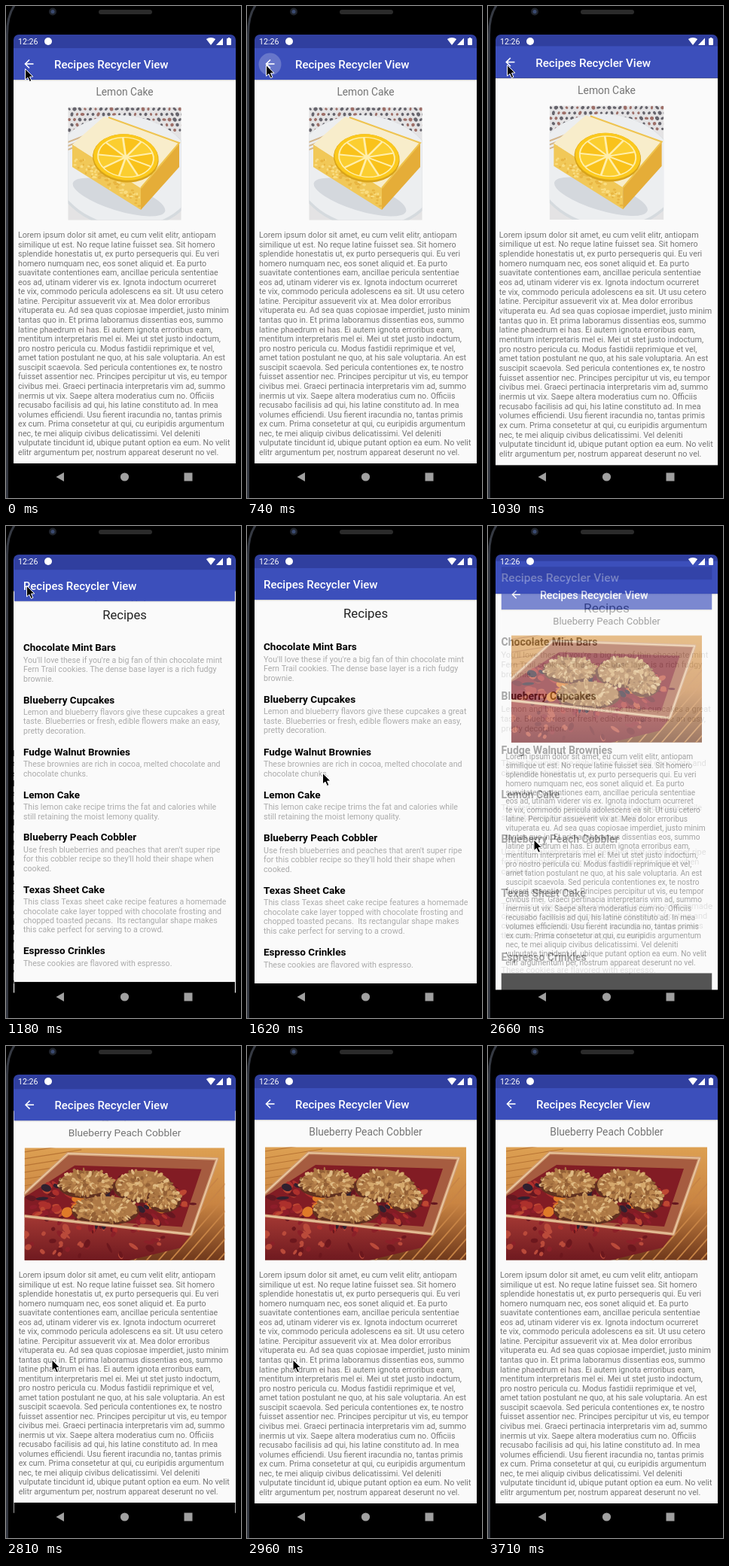
Recreate the animation shown at these times as an HTML page with a canvas. Size 312x654 px, loop 4.01 s.

```html
<!DOCTYPE html>
<html lang="en">
<head>
<meta charset="utf-8">
<title>Recipes Recycler View</title>
<style>
  html, body { margin: 0; width: 100%; height: 100%; overflow: hidden; background: #000; }
  canvas { display: block; width: 312px; height: 654px; }
</style>
</head>
<body>
<canvas id="stage"></canvas>
<script>
const W = 312, H = 654, LOOP = 4010;
const TICK = 148, LEAD = 12;
const LEFT = 10, TOP = 38, WIDTH = 295, NAV = 608;
const MID_X = 157.5, MID_Y = 346;
const LINE = 12.56;
const GREY = '#757575';
const SMALL = '10.7px Roboto, sans-serif';
const BOLD = 'bold 13.55px Roboto, sans-serif';

const dpr = window.devicePixelRatio || 1;
const makeContext = canvas => {
  canvas.width = W * dpr;
  canvas.height = H * dpr;
  return canvas.getContext('2d');
};
const stage = makeContext(document.getElementById('stage'));
const buffer = makeContext(document.createElement('canvas'));

const recipes = `Chocolate Mint Bars
You'll love these if you're a big fan of thin chocolate mint
Fern Trail cookies. The dense base layer is a rich fudgy
brownie.

Blueberry Cupcakes
Lemon and blueberry flavors give these cupcakes a great
taste. Blueberries or fresh, edible flowers make an easy,
pretty decoration.

Fudge Walnut Brownies
These brownies are rich in cocoa, melted chocolate and
chocolate chunks.

Lemon Cake
This lemon cake recipe trims the fat and calories while
still retaining the moist lemony quality.

Blueberry Peach Cobbler
Use fresh blueberries and peaches that aren't super ripe
for this cobbler recipe so they'll hold their shape when
cooked.

Texas Sheet Cake
This class Texas sheet cake recipe features a homemade
chocolate cake layer topped with chocolate frosting and
chopped toasted pecans.\u00a0 Its rectangular shape makes
this cake perfect for serving to a crowd.

Espresso Crinkles
These cookies are flavored with espresso.`.split('\n\n').map(block => block.split('\n'));

const lorem = `Lorem ipsum dolor sit amet, eu cum velit elitr, antiopam
similique ut est. No reque latine fuisset sea. Sit homero
splendide honestatis ut, ex purto persequeris qui. Eu veri
homero numquam nec, eos sonet aliquid et. Ea purto
suavitate contentiones eam, ancillae pericula sententiae
eos ad, utinam viderer vis ex. Ignota indoctum ocurreret
te vix, commodo pericula adolescens ea sit. Ut usu cetero
latine. Percipitur assueverit vix at. Mea dolor erroribus
vituperata eu. Ad sea quas copiosae imperdiet, justo minim
tantas quo in. Et prima laboramus dissentias eos, summo
latine phaedrum ei has. Ei autem ignota erroribus eam,
mentitum interpretaris mel ei. Mei ut stet justo indoctum,
pro nostro pericula cu. Modus fastidii reprimique et vel,
amet tation postulant ne quo, at his sale voluptaria. An est
suscipit scaevola. Sed pericula contentiones ex, te nostro
fuisset assentior nec. Principes percipitur ut vis, eu tempor
civibus mei. Graeci pertinacia interpretaris vim ad, summo
inermis ut vix. Saepe altera moderatius cum no. Officiis
recusabo facilisis ad qui, his latine constituto ad. In mea
volumes efficiendi. Usu fierent iracundia no, tantas primis
ex cum. Prima consetetur at qui, cu euripidis argumentum
nec, te mei aliquip civibus delicatissimi. Vel deleniti
vulputate tincidunt id, ubique putant option ea eum. No velit
elitr argumentum per, nostrum appareat deserunt no vel.`.split('\n');

const clamp = v => Math.min(1, Math.max(0, v));
const mix = (a, b, u) => a + (b - a) * u;

function seeded(seed) {
  return () => (seed = (seed * 16807) % 2147483647) / 2147483647;
}

function rect(c, x, y, w, h, color) {
  c.fillStyle = color;
  c.fillRect(x, y, w, h);
}

function trace(c, points) {
  c.beginPath();
  points.forEach(([x, y]) => c.lineTo(x, y));
}

function poly(c, points, color) {
  trace(c, points);
  c.closePath();
  c.fillStyle = color;
  c.fill();
}

function line(c, points, width, color) {
  trace(c, points);
  c.lineWidth = width;
  c.strokeStyle = color;
  c.stroke();
}

function oval(c, x, y, rx, ry, color, turn = 0) {
  c.beginPath();
  c.ellipse(x, y, rx, ry, turn, 0, Math.PI * 2);
  c.fillStyle = color;
  c.fill();
}

function pill(c, x, y, w, h, r, color) {
  c.beginPath();
  c.roundRect(x, y, w, h, r);
  c.fillStyle = color;
  c.fill();
}

function fade(c, y, h, ...colors) {
  const g = c.createLinearGradient(0, y, 0, y + h);
  colors.forEach((color, i) => g.addColorStop(i / (colors.length - 1), color));
  return g;
}

function text(c, str, x, y, font, color, align = 'left') {
  c.font = font;
  c.textAlign = align;
  c.fillStyle = color;
  c.fillText(str, x, y);
}

// Fills an ellipse with random flecks of the given colours.
function flecks(c, count, x, y, rx, ry, size, colors, rnd) {
  for (let i = 0; i < count; i++) {
    const a = rnd() * Math.PI * 2, d = Math.sqrt(rnd());
    oval(c, x + Math.cos(a) * rx * d, y + Math.sin(a) * ry * d,
      size * (0.5 + rnd()), size * (0.3 + rnd() * 0.6), colors[Math.floor(rnd() * colors.length)], a);
  }
}

function lemonPhoto(c) {
  const rnd = seeded(41);
  rect(c, 82, 134, 151, 151, '#e4e3e4');
  for (let i = 0; i < 110; i++) {
    const row = Math.floor(i / 22);
    oval(c, 84 + (i % 22) * 7 + (row % 2) * 3.5, 137 + row * 7, 1.5 + rnd() * 1.4, 1.5 + rnd(),
      rnd() < 0.3 ? '#9d6f68' : '#66646c', rnd() * 3);
  }
  oval(c, 158, 221, 96, 75, '#d5dade', 0.15);
  oval(c, 158, 219, 94, 73, '#eceef0', 0.15);
  for (let i = 0; i < 3; i++) line(c, [[82, 181 + i * 5], [118, 167 + i * 5]], 2, '#d3b58c');
  oval(c, 150, 254, 64, 18, '#d4d8dd', 0.3);

  const left = [88, 184], front = [179, 242], right = [230, 182], drop = ([x, y], h) => [x, y + h];
  poly(c, [left, front, drop(front, 29), drop(left, 30)], '#f1c858');
  poly(c, [front, right, drop(right, 32), drop(front, 29)], '#e5ad38');
  for (let i = 0; i < 70; i++) {
    const u = rnd();
    oval(c, mix(90, 178, u), mix(195, 250, u) + rnd() * 18, 1 + rnd() * 2, 1 + rnd(), i % 2 ? '#f9dd82' : '#e8b541');
  }
  poly(c, [[130, 147], right, front, left], '#f8edcb');
  line(c, [[136, 148], right, front], 2, '#efc450');

  c.save();
  c.translate(159, 201);
  c.rotate(0.1);
  c.scale(1, 0.71);
  oval(c, 0, 2, 44, 45, '#d8a31a');
  oval(c, 0, 0, 43, 43, '#fbc91d');
  oval(c, 0, 0, 38, 38, '#ffeeaa');
  for (let i = 0; i < 9; i++) {
    c.rotate(Math.PI * 2 / 9);
    c.beginPath();
    c.moveTo(4, 0);
    c.arc(0, 0, 36, -0.31, 0.31);
    c.fillStyle = i % 2 ? '#fbce30' : '#f9c21b';
    c.fill();
  }
  c.restore();
}

function cobblerPhoto(c) {
  const rnd = seeded(77);
  rect(c, 24, 134, 267, 151, fade(c, 134, 150, '#dda052', '#c98442', '#70391c'));
  for (let i = 0; i < 12; i++) {
    line(c, [[24, 140 + i * 9], [100, 128 + i * 9]], 1.2, '#b87535');
    line(c, [[150 + i * 16, 290], [250 + i * 16, 175]], 1.8, '#c78446');
  }

  const backLeft = [82, 142], backRight = [281, 149], frontRight = [246, 250], frontLeft = [10, 224];
  c.lineJoin = 'round';
  poly(c, [frontLeft, frontRight, [232, 268], [150, 288], [10, 288]], fade(c, 222, 62, '#a63a34', '#701a20'));
  poly(c, [backLeft, backRight, frontRight, frontLeft, [10, 205]], '#a65c40');
  poly(c, [[91, 158], [260, 163], [234, 240], [10, 224], [10, 209]], '#821c24');
  flecks(c, 150, 140, 208, 110, 37, 5, ['#651720', '#ad302c', '#8e1d2a', '#bd4732'], rnd);
  flecks(c, 40, 115, 258, 100, 22, 5, ['#6c171d', '#ba4a3a', '#8b2028'], rnd);
  flecks(c, 9, 140, 205, 85, 38, 9, ['#df7a28'], rnd);
  flecks(c, 14, 130, 200, 85, 36, 7, ['#30202e'], rnd);

  const crust = ['#d5a96d', '#bd8850', '#936036', '#dfbb84', '#a97542'];
  for (const [x, y, rx, ry] of [[106, 181, 38, 18], [182, 184, 40, 21], [132, 216, 45, 19], [210, 200, 23, 18]]) {
    oval(c, x, y + 3, rx, ry, '#60301f');
    oval(c, x, y, rx - 3, ry - 2, '#ae7946');
    flecks(c, 130, x, y, rx - 2, ry - 1, 3, crust, rnd);
  }
  line(c, [frontLeft, frontRight, backRight, backLeft, [10, 208]], 4, '#d2a079');
  line(c, [frontLeft, frontRight, backRight, backLeft, [10, 208]], 1.2, '#f0d3ac');
}

function chrome(c, titleX) {
  rect(c, LEFT, NAV, WIDTH, H - NAV, '#000');
  rect(c, LEFT, 98, WIDTH, NAV - 98, '#fafafa');
  rect(c, LEFT, 98, WIDTH, 2, fade(c, 98, 2, 'rgba(0,0,0,.18)', 'rgba(0,0,0,0)'));
  rect(c, LEFT, TOP, WIDTH, 60, '#3c4fbb');
  rect(c, LEFT, TOP, WIDTH, 18, '#303f9f');
  text(c, 'Recipes Recycler View', titleX, 83, '500 15.05px Roboto, sans-serif', '#fff');
}

function listPage(c) {
  chrome(c, 22);
  text(c, 'Recipes', MID_X, 122, '16.8px Roboto, sans-serif', '#222', 'center');
  let y = 165;
  for (const [name, ...lines] of recipes) {
    text(c, name, 22, y, BOLD, '#000');
    lines.forEach((str, i) => text(c, str, 22, y + 15.5 + i * LINE, SMALL, '#aaa'));
    y += 32.1 + lines.length * LINE;
  }
}

const detailPage = (name, width, photo) => c => {
  chrome(c, 64);
  line(c, [[36.5, 77], [26, 77]], 1.6, '#fff');
  line(c, [[31, 71.5], [25.5, 77], [31, 82.5]], 1.6, '#fff');
  text(c, name, MID_X, 118.8, '13.77px Roboto, sans-serif', GREY, 'center');
  c.save();
  c.beginPath();
  c.rect(MID_X - width / 2, 134.5, width, 150);
  c.clip();
  photo(c);
  c.restore();
  lorem.forEach((str, i) => text(c, str, 16, 308 + i * LINE, SMALL, GREY));
};
const lemonPage = detailPage('Lemon Cake', 150, lemonPhoto);
const cobblerPage = detailPage('Blueberry Peach Cobbler', 267, cobblerPhoto);

// Draws a page scaled about the screen centre, blended as one layer.
function layer(page, scale = 1, alpha = 1) {
  buffer.setTransform(dpr, 0, 0, dpr, 0, 0);
  buffer.clearRect(0, 0, W, H);
  buffer.translate(MID_X, MID_Y);
  buffer.scale(scale, scale);
  buffer.translate(-MID_X, -MID_Y);
  page(buffer);
  stage.globalAlpha = alpha;
  stage.drawImage(buffer.canvas, 0, 0, W, H);
  stage.globalAlpha = 1;
}

// The old page grows away while the new one grows in and fades up.
function swap(from, to, p) {
  layer(from, mix(1, 1.05, p));
  layer(to, mix(0.85, 1, p), clamp((p - 0.2) / 0.68));
}

function screen(k) {
  if (k < 7) {
    layer(lemonPage);
    if (k === 4 || k === 5) oval(stage, 30.5, 77.5, 8 + k * 1.4, 8 + k * 1.4, 'rgba(255,255,255,.22)');
  } else if (k < 9) swap(lemonPage, listPage, k === 7 ? 0.18 : 0.95);
  else if (k < 18) layer(listPage);
  else if (k < 20) swap(listPage, cobblerPage, k === 18 ? 0.65 : 0.97);
  else layer(cobblerPage);
}

function phone(c) {
  rect(c, 0, 0, W, H, '#000');
  c.beginPath();
  c.moveTo(12, -2);
  c.quadraticCurveTo(1.5, 12, 1.5, 38);
  c.lineTo(1.5, H);
  c.lineWidth = 3;
  c.strokeStyle = '#353942';
  c.stroke();
  oval(c, 62, 7.5, 5, 5, '#20242c');
  oval(c, 62, 7.5, 2.5, 2.5, '#3a4a70');
  pill(c, 123, 5, 71, 6, 3, '#2b2b2b');
}

function systemIcons(c) {
  text(c, '12:26', 16, 51, '10.6px Roboto, sans-serif', '#fff');
  oval(c, 56, 47, 5, 5, '#fff');
  c.beginPath();
  c.moveTo(272, 52);
  c.arc(272, 52, 10, -Math.PI * 0.71, -Math.PI * 0.29);
  c.fillStyle = '#fff';
  c.fill();
  poly(c, [[279, 52], [288, 52], [288, 42.5]], '#fff');
  pill(c, 293, 43, 6, 9, 1, '#fff');
  rect(c, 294.8, 42, 2.4, 1, '#fff');
  poly(c, [[66.5, 626], [77, 620], [77, 632]], '#a0a0a0');
  oval(c, 157.5, 626, 5.6, 5.6, '#a0a0a0');
  rect(c, 236.5, 620.5, 11, 11, '#a0a0a0');
}

// Pointer key points: [tick, x, y]
const path = [
  [1, 25, 83], [2, 25, 78.5], [7, 25, 78], [8, 27, 79], [9, 35, 109], [10, 90, 297],
  [11, 100, 328], [14, 60.5, 416.5], [21, 60.5, 416.5], [22, 216, 589], [23, 258.5, 638]
];

function pointerAt(k) {
  const next = path.findIndex(([tick]) => tick >= k);
  if (next < 0) return path.at(-1).slice(1);
  const b = path[next], a = path[next - 1] || b;
  const u = a === b ? 0 : (k - a[0]) / (b[0] - a[0]);
  return [mix(a[1], b[1], u), mix(a[2], b[2], u)];
}

function pointer(c, [x, y]) {
  c.save();
  c.translate(x + 0.5, y + 0.5);
  poly(c, [[0, 0], [0, 14.5], [3.4, 11.6], [5.9, 17], [8.4, 15.9], [6, 10.6], [10.4, 10.4]], '#000');
  c.lineWidth = 1;
  c.strokeStyle = '#fff';
  c.stroke();
  c.restore();
}

function render(k) {
  stage.setTransform(dpr, 0, 0, dpr, 0, 0);
  phone(stage);
  stage.save();
  stage.beginPath();
  stage.roundRect(LEFT, TOP, WIDTH, H, 7);
  stage.clip();
  screen(k);
  stage.restore();
  systemIcons(stage);
  if (k < 25) pointer(stage, pointerAt(k));
}

const start = performance.now();
let shown;
function play() {
  const t = (performance.now() - start) % LOOP;
  const k = Math.floor((t + LEAD) / TICK);
  if (k !== shown) render(shown = k);
  requestAnimationFrame(play);
}
play();
</script>
</body>
</html>
```
